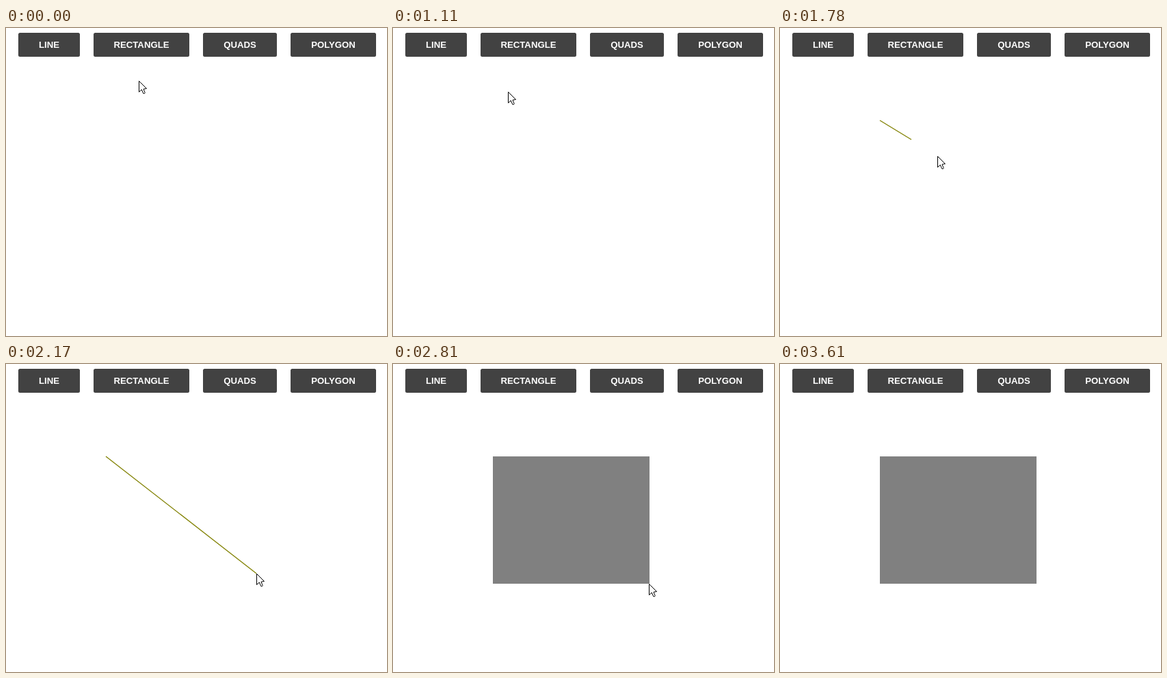
Write an HTML page that moves like this. It is 557 by 450 pixels and loops after 4220 ms.

```html
<!DOCTYPE html>
<html lang="en">
<head>
<meta charset="utf-8">
<title>Drawing a rectangle</title>
<style>
html, body { margin: 0; width: 100%; height: 100%; overflow: hidden; background: #fff; }
svg { display: block; }
text {
  font: bold 13.2px "Liberation Sans", Arial, sans-serif;
  text-anchor: middle; fill: #fff;
}
#cursor { fill: #fff; stroke: #000; stroke-linejoin: round; }
</style>
</head>
<body>
<svg width="557" height="450" viewBox="0 0 557 450">
  <g id="buttons"></g>
  <line id="line" x1="146" y1="135" stroke="#808000" stroke-width="1.3"/>
  <rect id="box" x="146" y="135" width="229" height="186" fill="#808080"/>
  <circle id="click" r="12" fill="#ff0" fill-opacity=".5"/>
  <g id="cursor">
    <path id="arrow" d="M.5 .5V16.5L4.3 13L6.8 18.7H8.6L9.2 17.6L7 12.2L11.5 11.5Z"/>
    <path id="hand" d="M-1.5 13V2Q-1.5 .5 0 .5T1.5 2V7Q3.5 5.7 4.5 7.5Q6.5 6.5 7.5 8.5Q10.5 8 10.5 11V15L8.5 18V21.5H-1.5V19L-5.2 13.5Q-6.2 11.5-4.5 11Z"/>
  </g>
</svg>
<script>
const LOOP = 4220, STEP = 77, LAG = 70, CLICK = 150;
const DRAG = 1700, DROP = 2810, LEAVE = 3610;
const $ = id => document.getElementById(id);

const labels = [["LINE", 90], ["RECTANGLE", 140], ["QUADS", 108], ["POLYGON", 125]];
let left = 18;
for (const [label, w] of labels) {
  $("buttons").innerHTML +=
    `<rect x="${left}" y="7" width="${w}" height="35" rx="2.5" fill="#424242"/>
     <text x="${left + w / 2}" y="29">${label}</text>`;
  left += w + 20;
}

const linear = p => p;
const easeIn = p => p ** 1.5;
const easeOut = p => 1 - easeIn(1 - p);

// Where the pointer arrives, and how it gets there
const keys = [
  { t: 0, x: 194, y: 77 },
  { t: 610, x: 180, y: 25 },
  { t: 760, x: 180, y: 25 },
  { t: 1110, x: 168, y: 93, ease: easeIn },
  { t: 1230, x: 155, y: 120 },
  { t: 1400, x: 146, y: 135 },
  { t: 1550, x: 146, y: 135 },
  { t: 1780, x: 230, y: 187, ease: easeIn },
  { t: 2100, x: 366, y: 306, ease: easeOut },
  { t: 2340, x: 366, y: 307 },
  { t: 2580, x: 374, y: 321 },
  { t: 2810, x: 374, y: 321 },
  { t: 3120, x: 278, y: 335, ease: easeIn },
  { t: 3200, x: 278, y: 335 },
  { t: 3520, x: 403, y: 385, ease: easeOut }
];
const clicks = [610, 1470, 2660];

function pointerAt(t) {
  const i = keys.findIndex(k => k.t > t);
  if (i < 0) return keys[keys.length - 1];
  const a = keys[i - 1], b = keys[i];
  const steps = Math.round((b.t - a.t) / STEP);
  const p = (b.ease || linear)(Math.floor((t - a.t) / (b.t - a.t) * steps) / steps);
  const mix = (from, to) => Math.round(from + (to - from) * p);
  return { x: mix(a.x, b.x), y: mix(a.y, b.y) };
}

const show = (id, on) => $(id).setAttribute("visibility", on ? "visible" : "hidden");
const set = (id, attrs) => {
  for (const key in attrs) $(id).setAttribute(key, attrs[key]);
};

function draw() {
  const t = performance.now() % LOOP;
  const { x, y } = pointerAt(t);
  const end = pointerAt(Math.max(0, t - LAG));
  const onButton = y < 42;

  set("cursor", { transform: `translate(${x} ${y})` });
  show("arrow", t < LEAVE && !onButton);
  show("hand", t < LEAVE && onButton);

  set("click", { cx: x, cy: y });
  show("click", clicks.some(c => t >= c && t < c + CLICK));

  // The line trails the pointer slightly
  set("line", { x2: end.x, y2: end.y });
  show("line", t >= DRAG && t < DROP);
  show("box", t >= DROP);
  requestAnimationFrame(draw);
}
draw();
</script>
</body>
</html>
```
